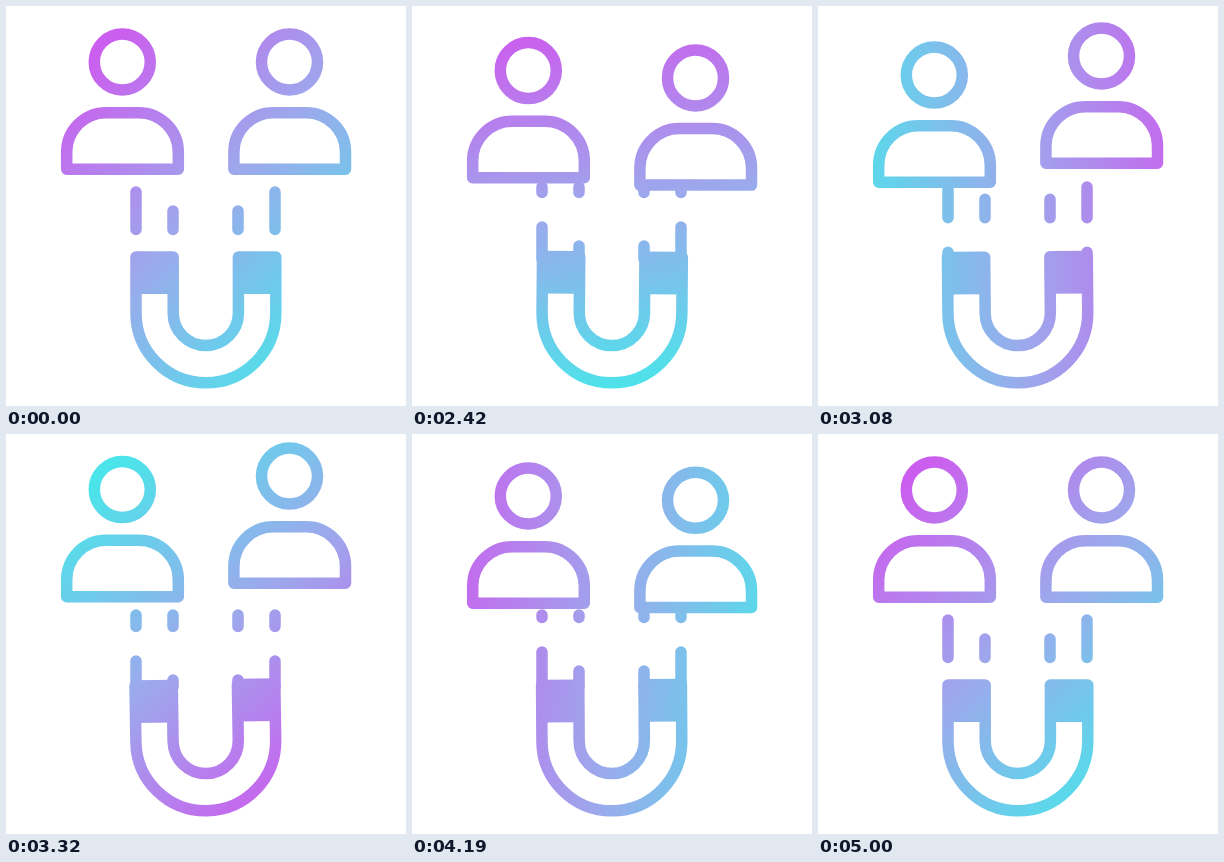
These frames come from a looping animation (400 px wide and 400 px high, 5.03 s). An HTML page:

```html
<!DOCTYPE html>
<html lang="en">
<head>
<meta charset="utf-8">
<title>Magnet attracting people</title>
<style>
  html, body { margin: 0; width: 100%; height: 100%; overflow: hidden; background: #fff; }
  svg { display: block; width: 100vw; height: 100vh; }
  .line { fill: none; stroke: #fff; stroke-width: 11.5; stroke-linecap: round; stroke-linejoin: round; }
</style>
</head>
<body>
<svg viewBox="0 0 400 400">
  <defs>
    <linearGradient id="tint" gradientUnits="userSpaceOnUse" x1="15" x2="385" y1="200" y2="200">
      <stop offset="0" stop-color="#cb5eee"/>
      <stop offset=".5" stop-color="#9ca9ec"/>
      <stop offset="1" stop-color="#4be4ea"/>
    </linearGradient>
    <g id="person">
      <circle cx="116.3" cy="56" r="28"/>
      <path d="M60.7 163.2V146A39.5 39.5 0 0 1 100.2 106.7H132.8A39.5 39.5 0 0 1 172.3 146V163.2Z"/>
    </g>
    <mask id="shape" maskUnits="userSpaceOnUse" x="0" y="0" width="400" height="400">
      <g class="line">
        <use id="left" href="#person"/>
        <use id="right" href="#person"/>
        <path id="pull"/>
        <g id="magnet">
          <path d="M130 251H167.2V307A32.6 32.6 0 0 0 232.4 307V251H269.8V307A69.9 69.9 0 0 1 130 307Z"/>
          <path d="M130 251H167.2V288H130ZM232.4 251H269.8V288H232.4Z" fill="#fff" stroke="none"/>
        </g>
      </g>
    </mask>
  </defs>
  <rect width="400" height="400" fill="url(#tint)" mask="url(#shape)"/>
</svg>
<script>
const LOOP = 5030, HOLD = 2000, STEP = 30, STEPS = 100;
const TOP = 181, SPAN = 72, TURNS = 5;
const el = id => document.getElementById(id);

// [step, vertical offset]
const leftBob = [[0, 0], [29, 18], [56.3, -14], [80, 11], [100, 0]];
const rightBob = [[0, 0], [18, 18], [45, -14], [68, 11], [100, 0]];
// [step, progress, slope per step]
const flow = [[0, 0, .008], [28, .233, .0135], [44, .514, .0165],
              [58, .722, .013], [73, .889, .0085], [100, 1, .0015]];

function segment(keys, n) {
  let i = 1;
  while (i < keys.length - 1 && n > keys[i][0]) i++;
  const [a, b] = [keys[i - 1], keys[i]];
  return [a, b, (n - a[0]) / (b[0] - a[0])];
}

function swing(keys, n) {
  const [a, b, x] = segment(keys, n);
  return a[1] + (b[1] - a[1]) * (1 - Math.cos(Math.PI * x)) / 2;
}

function hermite(keys, n) {
  const [a, b, x] = segment(keys, n);
  const w = b[0] - a[0], y = 1 - x;
  return a[1] * (1 + 2 * x) * y * y + b[1] * x * x * (3 - 2 * x)
       + w * x * y * (a[2] * y - b[2] * x);
}

// A dash that slides down its track and re-enters at the top.
function dash(x, start, length, shift) {
  const a = (start + shift) % SPAN, b = a + length;
  const bar = (from, to) => `M${x} ${TOP + from}V${TOP + to}`;
  return b <= SPAN ? bar(a, b) : bar(a, SPAN) + bar(0, b - SPAN);
}

function draw() {
  const t = performance.now() % LOOP;
  const n = Math.min(STEPS, Math.max(0, Math.floor((t - HOLD) / STEP)));
  const p = hermite(flow, n);
  const shift = p * SPAN * TURNS % SPAN;
  const tilt = -Math.sin(2 * Math.PI * 28 * n / STEPS);

  el("tint").setAttribute("gradientTransform", `rotate(${45 + 360 * p} 200 200)`);
  el("left").setAttribute("y", swing(leftBob, n));
  el("right").setAttribute("x", 167.2);
  el("right").setAttribute("y", swing(rightBob, n));
  el("magnet").setAttribute("transform", `rotate(${tilt} 200 314)`);
  el("pull").setAttribute("d",
    [130, 269].map(x => dash(x, 5, 37.5, shift)).join("") +
    [167, 232].map(x => dash(x, 24, 18.5, shift)).join(""));
  requestAnimationFrame(draw);
}
draw();
</script>
</body>
</html>
```
